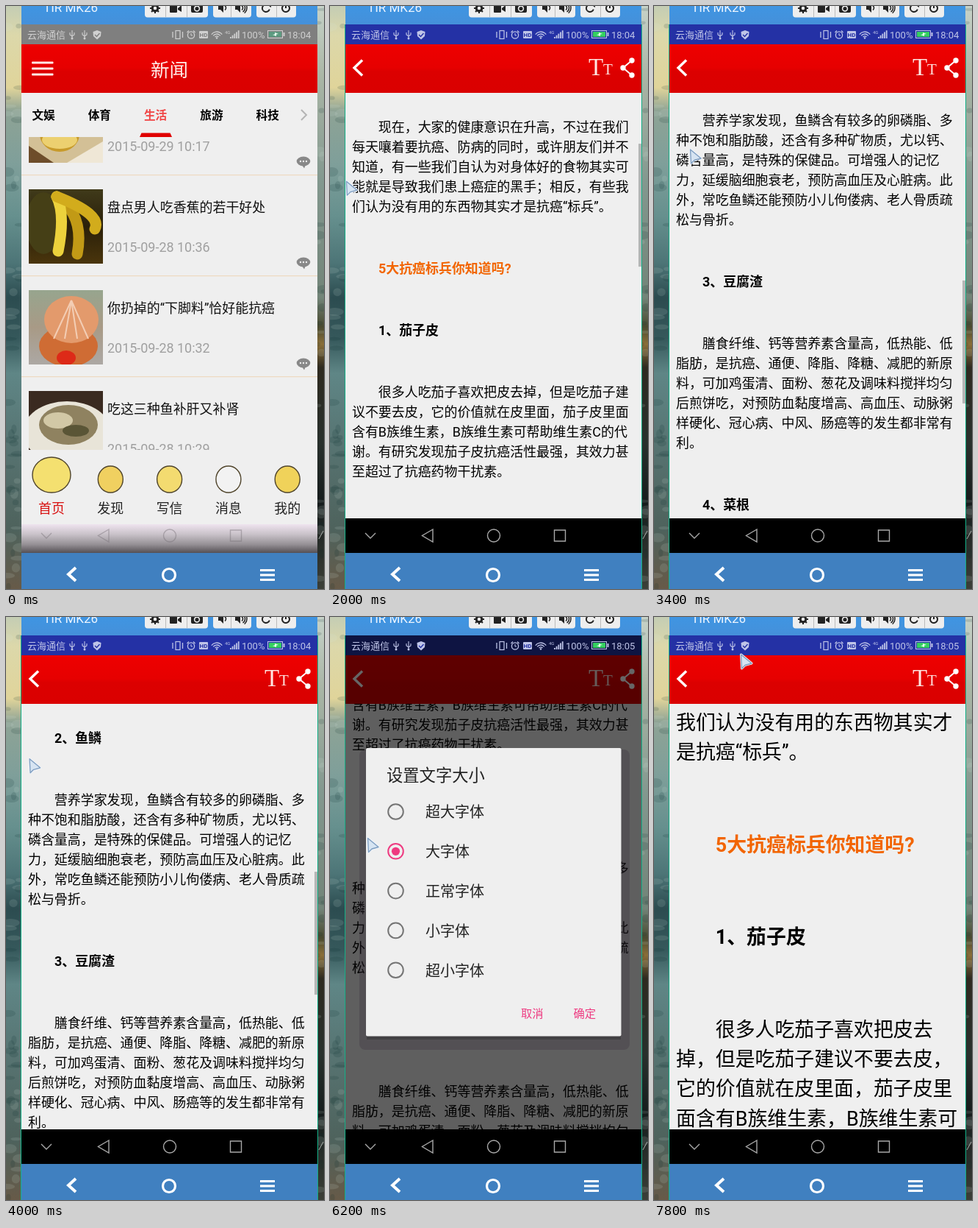
Recreate the animation shown at these times as an HTML page with a canvas. Size 433x792 px, loop 8000 ms.

```html
<!DOCTYPE html>
<html lang="zh-CN">
<head>
<meta charset="utf-8">
<title>新闻阅读</title>
<style>
html, body { margin: 0; width: 100%; height: 100%; overflow: hidden; background: #6f8f8e; }
canvas { display: block; width: 433px; height: 792px; }
</style>
</head>
<body>
<canvas id="stage" width="433" height="792"></canvas>
<script>
const g = document.getElementById('stage').getContext('2d');
const LOOP = 8000, STEP = 200;
const SANS = 'Roboto, "Noto Sans CJK SC", "Noto Sans CJK", sans-serif';
const BG = '#efefef', PINK = '#ee3a80';
// font size, line height and paragraph gap of the article body
const NORMAL = [17.95, 27, 84], LARGE = [26.9, 40.4, 125.4];

// ---- drawing helpers ----
function rect(x, y, w, h, fill) { g.fillStyle = fill; g.fillRect(x, y, w, h); }

function round(x, y, w, h, r, fill) {
  g.beginPath(); g.roundRect(x, y, w, h, r);
  g.fillStyle = fill; g.fill();
}

function oval(x, y, rx, ry, fill, stroke, width = 1.5) {
  g.beginPath(); g.ellipse(x, y, rx, ry, 0, 0, 7);
  if (fill) { g.fillStyle = fill; g.fill(); }
  if (stroke) { g.strokeStyle = stroke; g.lineWidth = width; g.stroke(); }
}

function trace(pts) {
  g.beginPath();
  for (let i = 0; i < pts.length; i += 2) g.lineTo(pts[i], pts[i + 1]);
}
function line(pts, color, width = 1, close) {
  trace(pts);
  if (close) g.closePath();
  g.strokeStyle = color; g.lineWidth = width; g.stroke();
}
function poly(pts, fill) { trace(pts); g.fillStyle = fill; g.fill(); }

function arc(x, y, r, a, b, color, width = 1) {
  g.beginPath(); g.arc(x, y, r, a, b);
  g.strokeStyle = color; g.lineWidth = width; g.stroke();
}

// y is the vertical middle of the glyphs
function text(s, x, y, size, color, weight = 400, align = 'left', font = SANS) {
  g.font = `${weight} ${size}px ${font}`;
  g.textAlign = align; g.fillStyle = color;
  g.fillText(s, x, y + size * 0.37);
}

function fade(x, y, w, h, stops) {
  const gr = g.createLinearGradient(0, y, 0, y + h);
  stops.forEach(([p, c]) => gr.addColorStop(p, c));
  rect(x, y, w, h, gr);
}

function clipped(x, y, w, h, draw) {
  g.save();
  g.beginPath(); g.rect(x, y, w, h); g.clip();
  draw();
  g.restore();
}

function withAlpha(a, draw) { g.save(); g.globalAlpha = a; draw(); g.restore(); }

function seeded(n) {
  return () => (n = (n * 16807) % 2147483647) / 2147483647;
}

// keys: [time, value...]; eased between neighbours
function track(keys, t) {
  if (t <= keys[0][0]) return keys[0].slice(1);
  for (let i = 1; i < keys.length; i++) {
    const [a, b] = [keys[i - 1], keys[i]];
    if (t <= b[0]) {
      const p = (t - a[0]) / (b[0] - a[0]), e = p * p * (3 - 2 * p);
      return a.slice(1).map((v, k) => v + (b[k + 1] - v) * e);
    }
  }
  return keys[keys.length - 1].slice(1);
}

// ---- content ----
const article = [
  ['　　现在，大家的健康意识在升高，不过在我们', '每天嚷着要抗癌、防病的同时，或许朋友们并不',
   '知道，有一些我们自认为对身体好的食物其实可', '能就是导致我们患上癌症的黑手；相反，有些我',
   '们认为没有用的东西物其实才是抗癌“标兵”。'],
  '5大抗癌标兵你知道吗?',
  '1、茄子皮',
  ['　　很多人吃茄子喜欢把皮去掉，但是吃茄子建', '议不要去皮，它的价值就在皮里面，茄子皮里面',
   '含有B族维生素，B族维生素可帮助维生素C的代', '谢。有研究发现茄子皮抗癌活性最强，其效力甚',
   '至超过了抗癌药物干扰素。'],
  '2、鱼鳞',
  ['　　营养学家发现，鱼鳞含有较多的卵磷脂、多', '种不饱和脂肪酸，还含有多种矿物质，尤以钙、',
   '磷含量高，是特殊的保健品。可增强人的记忆', '力，延缓脑细胞衰老，预防高血压及心脏病。此',
   '外，常吃鱼鳞还能预防小儿佝偻病、老人骨质疏', '松与骨折。'],
  '3、豆腐渣',
  ['　　膳食纤维、钙等营养素含量高，低热能、低', '脂肪，是抗癌、通便、降脂、降糖、减肥的新原',
   '料，可加鸡蛋清、面粉、葱花及调味料搅拌均匀', '后煎饼吃，对预防血黏度增高、高血压、动脉粥',
   '样硬化、冠心病、中风、肠癌等的发生都非常有', '利。'],
  '4、菜根'
];
const articleLarge = [
  ['我们认为没有用的东西物其实才', '是抗癌“标兵”。'],
  article[1], article[2],
  ['　　很多人吃茄子喜欢把皮去', '掉，但是吃茄子建议不要去皮，', '它的价值就在皮里面，茄子皮里', '面含有B族维生素，B族维生素可']
];
const items = [
  ['', '2015-09-29 10:17', lemons],
  ['盘点男人吃香蕉的若干好处', '2015-09-28 10:36', bananas],
  ['你扔掉的“下脚料”恰好能抗癌', '2015-09-28 10:32', orange],
  ['吃这三种鱼补肝又补肾', '2015-09-28 10:29', fish]
];

// ---- thumbnails, 101 x 101 ----
function lemons() {
  rect(0, 0, 101, 101, '#d3c096');
  oval(42, 62, 27, 24, '#c79a2a');
  oval(42, 70, 24, 12, '#ecd070');
  poly([0, 78, 34, 101, 0, 101], '#6e4d2a');
  poly([52, 101, 101, 72, 101, 101], '#efe7d6');
}
function bananas() {
  fade(0, 0, 101, 101, [[0, '#403a1a'], [0.5, '#2a2009'], [1, '#4a350c']]);
  oval(20, 46, 24, 42, '#453f16');
  g.lineCap = 'round';
  for (const [x, y, c] of [[66, 96, '#c29a16'], [40, 92, '#ecd23c'], [90, 62, '#d2ac1c']]) {
    g.beginPath(); g.moveTo(38, 10); g.quadraticCurveTo(x + 10, 34, x, y - 8);
    g.strokeStyle = c; g.lineWidth = 15; g.stroke();
  }
  g.lineCap = 'butt';
}
function orange() {
  fade(0, 0, 101, 101, [[0, '#97a58e'], [0.5, '#a89a86'], [1, '#aca8a4']]);
  oval(54, 76, 40, 28, '#cf6c34');
  oval(58, 40, 37, 32, '#e39a6c');
  for (const dx of [-24, -9, 8, 23]) line([58, 14, 58 + dx, 66], '#f3cdb4', 2);
  oval(51, 92, 13, 10, '#dd2a18');
}
function fish() {
  rect(0, 0, 101, 101, '#3a2a20');
  oval(52, 56, 60, 42, '#e8e4d8');
  oval(54, 46, 40, 27, '#8f8260');
  oval(40, 40, 20, 11, '#d2c8a6');
  oval(64, 54, 18, 8, '#5a5536');
}

// ---- desktop and window frame ----
function wallpaper() {
  fade(0, 0, 21, 792, [[0, '#c4cdb4'], [0.05, '#dcd8aa'], [0.14, '#e0d49a'], [0.18, '#8ea395'], [0.27, '#7f9f9a'],
    [0.36, '#66908e'], [0.44, '#4d7577'], [0.5, '#2c4c50'], [0.57, '#35585b'],
    [0.63, '#5f8686'], [0.75, '#577472'], [0.9, '#4e625c'], [1, '#675a48']]);
  fade(424, 0, 9, 792, [[0, '#c6d2c8'], [0.12, '#aab6a6'], [0.3, '#83988f'], [0.5, '#728478'], [0.55, '#4a4a30'],
    [0.58, '#8a6e38'], [0.62, '#2e2a20'], [0.75, '#28302c'], [0.85, '#161c1c'], [1, '#3b3f38']]);
  const rnd = seeded(41);
  for (let k = 0; k < 70; k++) {
    const x = k % 3 ? rnd() * 20 : 424 + rnd() * 9;
    oval(x, rnd() * 792, 3 + rnd() * 9, 2 + rnd() * 5, rnd() < 0.5 ? 'rgba(215,235,225,.13)' : 'rgba(10,40,45,.14)');
  }
  line([426, 724, 432, 713], '#aab0ac', 1);
}

function topBar() {
  fade(21, 0, 403, 25, [[0, '#3f95e2'], [1, '#4590da']]);
  text('TIR MK26', 51, 2, 17, '#eef6ff');
  const ink = '#222';
  for (const [x, w, cuts] of [[189, 86, [217, 246]], [282, 52, [306]], [341, 54, [368]]]) {
    round(x, -8, w, 23.5, 4, '#eeeeee');
    for (const c of cuts) rect(c, 0, 1, 15, '#bbbbbb');
  }
  oval(203, 3, 3.8, 3.8, null, ink, 3);
  for (let k = 0; k < 8; k++) {
    const c = Math.cos(k * Math.PI / 4), s = Math.sin(k * Math.PI / 4);
    line([203 + c * 4, 3 + s * 4, 203 + c * 7, 3 + s * 7], ink, 2);
  }
  round(223, -2, 10, 11, 1, ink);
  poly([234, 3, 239, -1, 239, 8, 234, 5], ink);
  round(252, -2, 16, 11, 2, ink);
  oval(260, 3.5, 3.4, 3.4, null, '#eee', 1.6);
  for (const x of [289, 312]) {
    poly([x, 0, x + 3, 0, x + 7, -4, x + 7, 9, x + 3, 5, x, 5], ink);
    arc(x + 7, 2.5, 3.5, -1, 1, ink, 1.5);
  }
  arc(319, 2.5, 6.5, -1, 1, ink, 1.5);
  arc(319, 2.5, 9, -0.9, 0.9, ink, 1.5);
  arc(354, 3, 5, 0.3, 5.2, ink, 2);
  poly([355, -2, 361, -2, 361, 2], ink);
  arc(381, 3, 5, -0.9, 4.1, ink, 2);
  line([381, -4, 381, 3], ink, 2);
}

function statusIcons(clock, light, back) {
  text('云海通信', 29, 39, 13, light);
  for (const x of [90, 107]) {
    line([x, 33, x, 44], light, 1.1);
    line([x - 3, 36, x - 3, 39, x, 41, x + 3, 39, x + 3, 36], light, 1.1);
    oval(x, 44, 1.5, 1.5, light);
  }
  poly([124, 33, 129.5, 35, 129, 41, 124, 45.5, 119, 41, 118.5, 35], light);
  line([121, 39, 123.5, 41.5, 127.5, 37], back, 1.4);
  g.strokeStyle = light; g.lineWidth = 1.2;
  g.strokeRect(231, 33.5, 6, 11);
  for (const x of [227, 240.5]) line([x, 35, x, 43], light, 1.3);
  oval(252, 39.5, 4.6, 4.6, null, light, 1.3);
  line([252, 37, 252, 40, 254, 40], light);
  line([246.5, 36, 249, 33.5], light, 1.3);
  line([255, 33.5, 257.5, 36], light, 1.3);
  round(263, 34, 12, 10, 1, light);
  text('HD', 269, 39, 8, back, 700, 'center');
  for (const r of [3, 6, 9]) arc(287, 44, r, -2.5, -0.64, light, 1.3);
  oval(287, 43.5, 1.2, 1.2, light);
  text('4G', 298, 36, 6, light);
  for (let k = 0; k < 5; k++) rect(305 + k * 2.7, 42 - k * 2.2, 1.8, 2 + k * 2.2, light);
  text('100%', 321, 39, 13, light);
  g.strokeStyle = light; g.lineWidth = 1;
  g.strokeRect(356.5, 33.5, 20, 10);
  rect(377.5, 36, 2, 5, light);
  rect(358, 35, 17, 7, back === '#7f7f7f' ? '#5d9a80' : '#35d060');
  poly([366, 36, 371, 38, 368, 38.5, 368, 41, 363, 39, 366, 38.5], '#e8fff0');
  text(clock, 383, 39, 13, light);
}

function navIcons(color) {
  line([48, 716, 55, 723, 62, 716], color, 1.4);
  line([140, 711, 125.5, 719.5, 140, 728], color, 1.4, true);
  oval(223, 719.5, 8.5, 8.5, null, color, 1.4);
  line([305.5, 712, 320.5, 712, 320.5, 727, 305.5, 727], color, 1.4, true);
}

function bottomBar() {
  rect(21, 743, 403, 49, '#4080c0');
  line([95, 763, 85, 772, 95, 781], '#fff', 4);
  oval(222, 773, 8.5, 8.5, null, '#fff', 3.2);
  for (const y of [765, 771.5, 778]) rect(346, y, 20, 3, '#fff');
}

function header() {
  fade(21, 52, 403, 66, [[0, '#ee0000'], [0.48, '#e60000'], [0.56, '#dc0000'], [1, '#da0000']]);
}

// ---- list page ----
function listPage(pressed) {
  rect(21, 25, 403, 718, BG);
  rect(21, 25, 403, 27, '#7f7f7f');
  header();
  for (const y of [77, 85, 93]) round(35, y - 1.6, 29.5, 3.2, 1, '#ffe9e6');
  text('新闻', 222.5, 86.5, 25.5, '#fff0ec', 400, 'center');

  ['文娱', '体育', '生活', '旅游', '科技'].forEach((s, i) =>
    text(s, 51 + i * 76.3, 148.5, 15.6, i === 2 ? '#f04545' : '#000', 700, 'center'));
  line([402, 141, 409, 148, 402, 155], '#b4b4b4', 2);
  poly([184.5, 172.5, 223.5, 172.5, 226, 178, 182, 178], '#e00000');

  clipped(21, 178, 403, 425, () => items.forEach(([title, date, photo], i) => {
    const y = 112 + i * 137;
    if (pressed && i === 2) rect(21, y - 19, 403, 136, '#dddddd');
    g.save(); g.translate(31, y);
    clipped(0, 0, 101, 101, photo);
    g.restore();
    text(title, 138, y + 24, 17.95, '#111');
    text(date, 138, y + 78, 17.95, '#a0a0a0');
    oval(405, y + 99, 9.3, 6.5, '#888888');
    poly([403, y + 104, 408, y + 104, 406, y + 108.5], '#888888');
    for (const d of [-4, 0, 4]) oval(405 + d, y + 99, 1.2, 1.2, '#eee');
    rect(21, y + 117, 403, 1.2, '#eed9c0');
  }));

  const tabs = [['首页', '#f4e070', 26, 24], ['发现', '#f0d060'], ['写信', '#f3db70'], ['消息', '#f2f2f2'], ['我的', '#f0d25a']];
  tabs.forEach(([label, fill, rx = 17, ry = 18], i) => {
    const x = 62 + i * 80.3;
    oval(x, i ? 643 : 637, rx, ry, fill, '#50452c', 1.4);
    text(label, x, 682, 17.95, i ? '#222' : '#d81010', 400, 'center');
  });
  fade(21, 704, 403, 39, [[0, '#efe4ef'], [0.35, '#c9c2c9'], [0.7, '#969196'], [1, '#555055']]);
  navIcons('rgba(120,112,120,.45)');
}

// ---- article page ----
function blocks(list, y, [size, lead, gap]) {
  for (const b of list) {
    if (typeof b === 'string') {
      text(b, 30 + size * 2, y, size, b[0] === '5' ? '#f26500' : '#000', 700);
    } else {
      b.forEach((s, k) => text(s, 30, y + k * lead, size, '#000'));
      y += (b.length - 1) * lead;
    }
    y += gap;
  }
}

function articleTop(off) {
  text('你扔掉的“下脚料”恰好能抗癌', 30, 162 - off, 26.9, '#000', 700);
  text('2015-09-28 10:32 来源：暖杉', 30, 225 - off, 26.9, '#000', 700);
  text('养生小报', 30, 265.4 - off, 26.9, '#000', 700);
  const y = 307 - off;
  g.strokeStyle = '#c4c4c4'; g.lineWidth = 1;
  g.strokeRect(212.5, y + 0.5, 21, 21);
  rect(216, y + 4, 14, 15, '#fff');
  rect(217, y + 5, 12, 9, '#b9d3f2');
  poly([216, y + 19, 216, y + 15, 221, y + 10, 230, y + 17, 230, y + 19], '#58a05a');
  poly([226, y + 4, 230, y + 4, 230, y + 8], '#8a8a8a');
  g.strokeStyle = '#8d9aa8';
  g.strokeRect(216.5, y + 4.5, 13, 14);
}

function articlePage({ loaded, large, scroll, bar }) {
  rect(21, 52, 403, 645, BG);
  rect(21, 25, 403, 27, '#2431a5');
  clipped(21, 118, 403, 578, () => {
    if (large) blocks(articleLarge, 143, LARGE);
    else if (loaded) { articleTop(scroll); blocks(article, 404 - scroll, NORMAL); }
    if (bar) rect(420, 118 + scroll * 0.288, 4, 167, '#b6b6b6');
  });
  header();
  line([44, 73.5, 33, 84, 44, 94.5], '#fff', 3.4);
  const serif = '"Liberation Serif", serif';
  text('T', 352, 81.5, 33, '#ffe4e0', 400, 'left', serif);
  text('T', 372, 85.5, 21, '#ffe4e0', 400, 'left', serif);
  line([411, 74, 399, 84, 411, 94], '#fff', 2);
  for (const [x, y] of [[411, 74], [399, 84], [411, 94]]) oval(x, y, 3.7, 3.7, '#fff');
}

// ---- dialog ----
function dialogText(choice, ghost) {
  const ink = ghost ? '#dcd6dc' : '#222', pink = ghost ? '#eccbe0' : PINK;
  text('设置文字大小', 77, 215, 22.3, ink, 500);
  ['超大字体', '大字体', '正常字体', '小字体', '超小字体'].forEach((s, i) => {
    const y = 265 + i * 53.8, on = i === choice;
    oval(89.5, y - 0.5, 10.3, 10.3, null, on ? pink : ghost ? ink : '#757575', 2);
    if (on) oval(89.5, y - 0.5, 5.6, 5.6, pink);
    text(s, 130, y, 20, ink);
  });
  text('取消', 260, 538, 15.3, pink, 500);
  text('确定', 331.5, 538, 15.3, pink, 500);
}

function dialog(choice) {
  round(40, 180, 368, 408, 8, 'rgba(50,38,54,.25)');
  rect(50, 569, 346, 5, 'rgba(0,0,0,.2)');
  round(49, 178, 347.5, 391.5, 2, BG);
  dialogText(choice, false);
}

function dialogGhost() {
  g.save();
  g.globalCompositeOperation = 'multiply';
  g.beginPath();
  g.roundRect(40, 175, 367, 413, 5);
  g.rect(48, 179, 349, 395);
  g.fillStyle = '#f2dff2';
  g.fill('evenodd');
  rect(50, 569, 346, 5, '#dddddd');
  dialogText(1, true);
  g.restore();
}

function cursor(x, y) {
  g.save();
  g.translate(x, y);
  g.lineJoin = 'round';
  const shape = [0.5, 1, 1.5, 20, 6, 15.5, 15, 13];
  line(shape, '#eef4fb', 3, true);
  poly(shape, '#d6e4f2');
  line(shape, '#7d9cbf', 1.3, true);
  g.restore();
}

// ---- timeline ----
const scrollKeys = [[1000, 0], [1800, 150], [2200, 330], [2600, 379], [2800, 470], [3400, 885], [3800, 885], [4200, 699]];
const cursorKeys = [[400, -24, 350], [1000, 15, 326], [2600, 25, 196], [3400, 49, 194], [5000, -6, 187],
  [5600, -6, 187], [6800, 108, 412], [7800, 118, 50]];
const dimKeys = [[4400, 0], [4800, 0.6], [6600, 0.6], [6800, 0.2], [7000, 0]];

function draw(t) {
  const detail = t >= 400;
  const [dim] = track(dimKeys, t);
  wallpaper();
  topBar();
  if (t < 600) listPage(t >= 200);
  if (detail) withAlpha(t < 600 ? 0.5 : 1, () => {
    articlePage({
      loaded: t >= 800, large: t >= 7000,
      scroll: track(scrollKeys, t)[0], bar: t >= 800 && t < 4600
    });
    if (dim > 0) rect(21, 25, 403, 671, `rgba(0,0,0,${dim})`);
    rect(21, 696, 403, 47, '#000');
    navIcons('#a8a8a8');
  });
  if (t >= 4600 && t < 6800) withAlpha(t < 4800 ? 0.6 : 1, () => dialog(t < 5800 ? 2 : 1));
  if (t === 6800) dialogGhost();
  statusIcons(t < 6000 ? '18:04' : '18:05', detail ? '#bfc5e8' : '#d0d0d0', detail ? '#2431a5' : '#7f7f7f');
  bottomBar();
  if (t >= 200) for (const x of [20, 424]) rect(x, 25, 1, 767, '#14b087');
  cursor(...track(cursorKeys, t));
}

function tick(now) {
  draw(Math.floor((now % LOOP) / STEP) * STEP);
  requestAnimationFrame(tick);
}
draw(0);
requestAnimationFrame(tick);
</script>
</body>
</html>
```
